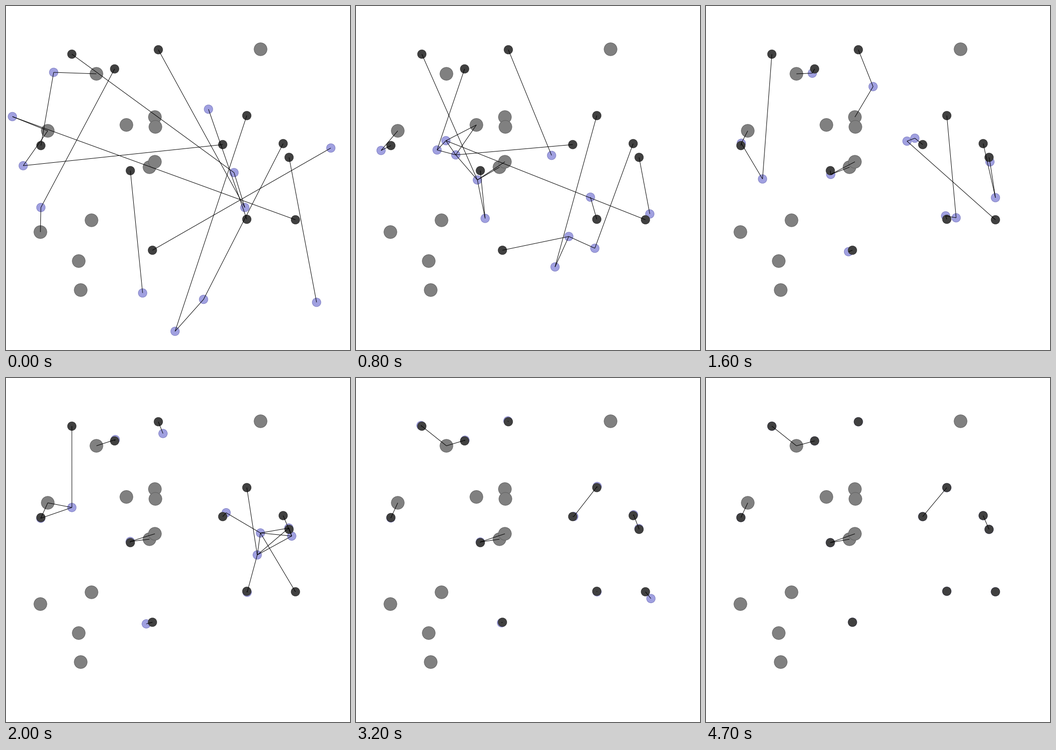
A matplotlib script for the animation above (4800 ms loop, 700 by 700 pixels).

```python
import numpy as np
import matplotlib.pyplot as plt
from matplotlib.animation import FuncAnimation
from matplotlib.collections import LineCollection
from matplotlib.patches import Circle

SIZE, DPI = 700, 100
FRAMES, INTERVAL = 48, 100
UNIT = SIZE / 8              # sensing range in pixels
BODY, ROCK = 0.1 * UNIT, 0.15 * UNIT
FADE = 8                     # ticks from the last detour point to the free path
THIN = 72 / DPI              # one pixel in points

OBSTACLES = np.array([
    (518, 88), (184, 138), (245, 242), (303, 226), (304, 246), (85, 254),
    (292, 328), (303, 317), (174, 436), (70, 460), (148, 519), (152, 578)])

# Start, goal and, for robots that give way, detour points by tick.
ROBOTS = [
    ((97, 135), (71, 284), {4: (88, 211), 8: (51, 294)}),
    ((13, 225), (589, 435), {8: (183, 274), 16: (409, 275), 24: (601, 376), 28: (609, 441)}),
    ((35, 325), (441, 282), {8: (203, 303), 16: (425, 269)}),
    ((71, 410), (221, 128), {8: (165, 293)}),
    ((412, 210), (490, 434), {8: (477, 389)}),
    ((464, 339), (134, 98), {4: (380, 329), 8: (247, 354), 16: (115, 352), 24: (162, 164)}),
    ((486, 410), (310, 89), {8: (398, 304), 16: (340, 164)}),
    ((661, 289), (298, 497), {4: (574, 381), 8: (433, 469), 16: (290, 500)}),
    ((278, 584), (253, 335), {}),
    ((402, 597), (564, 280), {8: (486, 493), 16: (589, 390)}),
    ((344, 662), (490, 223), {8: (405, 531), 16: (509, 431), 24: (501, 288)}),
    ((632, 603), (576, 308), {}),
]


def spring(t, omega=0.225, zeta=0.8):
    """Remaining share of the way for a damped spring released at rest."""
    root = np.sqrt(1 - zeta ** 2)
    phase = root * omega * t
    return np.exp(-zeta * omega * t) * (np.cos(phase) + zeta / root * np.sin(phase))


def hermite(t, knots, values):
    """Smooth curve through the values, at rest at both ends."""
    slopes = np.gradient(values, knots, axis=0)
    slopes[[0, -1]] = 0
    t = np.clip(t, knots[0], knots[-1])
    i = np.clip(np.searchsorted(knots, t, side="right") - 1, 0, len(knots) - 2)
    h = (knots[i + 1] - knots[i])[:, None]
    u = (t - knots[i])[:, None] / h
    return ((1 + 2 * u) * (1 - u) ** 2 * values[i] + u * (1 - u) ** 2 * h * slopes[i]
            + u * u * (3 - 2 * u) * values[i + 1] + u * u * (u - 1) * h * slopes[i + 1])


def path(start, goal, detour):
    """Spring pull to the goal plus a smooth deviation through the detour points."""
    start, goal = np.array(start, float), np.array(goal, float)

    def pull(t):
        return goal + (start - goal) * spring(t)[:, None]

    t = np.arange(FRAMES, dtype=float)
    if not detour:
        return pull(t)
    knots = np.array([0, *detour, max(detour) + FADE], float)
    offsets = np.zeros((len(knots), 2))
    offsets[1:-1] = np.array(list(detour.values())) - pull(knots[1:-1])
    return pull(t) + hermite(t, knots, offsets)


goals = np.array([goal for _, goal, _ in ROBOTS])
tracks = np.array([path(*robot) for robot in ROBOTS])

fig = plt.figure(figsize=(SIZE / DPI, SIZE / DPI), dpi=DPI, facecolor="white")
ax = fig.add_axes([0, 0, 1, 1])
ax.set(xlim=(0, SIZE), ylim=(SIZE, 0))
ax.axis("off")


def add_discs(centers, radius, face, edge, layer):
    return [ax.add_patch(Circle(c, radius, facecolor=face, edgecolor=edge,
                                linewidth=THIN, zorder=layer)) for c in centers]


add_discs(OBSTACLES, ROCK, "#808080", "#626262", 1)
robots = add_discs(tracks[:, 0], BODY, "#a0a0e0", "#8080c4", 2)
add_discs(goals, BODY, "#404040", "#303030", 3)
links = LineCollection([], colors="black", linewidths=THIN, zorder=4)
ax.add_collection(links)


def near(p, q):
    return np.hypot(*(p - q)) < UNIT


def update(frame):
    spots = tracks[:, frame]
    segments = list(zip(spots, goals))
    for k, p in enumerate(spots):
        robots[k].center = p
        others = np.vstack([spots[k + 1:], OBSTACLES])
        segments += [(p, q) for q in others if near(p, q)]
    links.set_segments(segments)
    return [*robots, links]


anim = FuncAnimation(fig, update, frames=FRAMES, interval=INTERVAL, repeat=True,
                     repeat_delay=0, blit=False)
plt.show()
```
